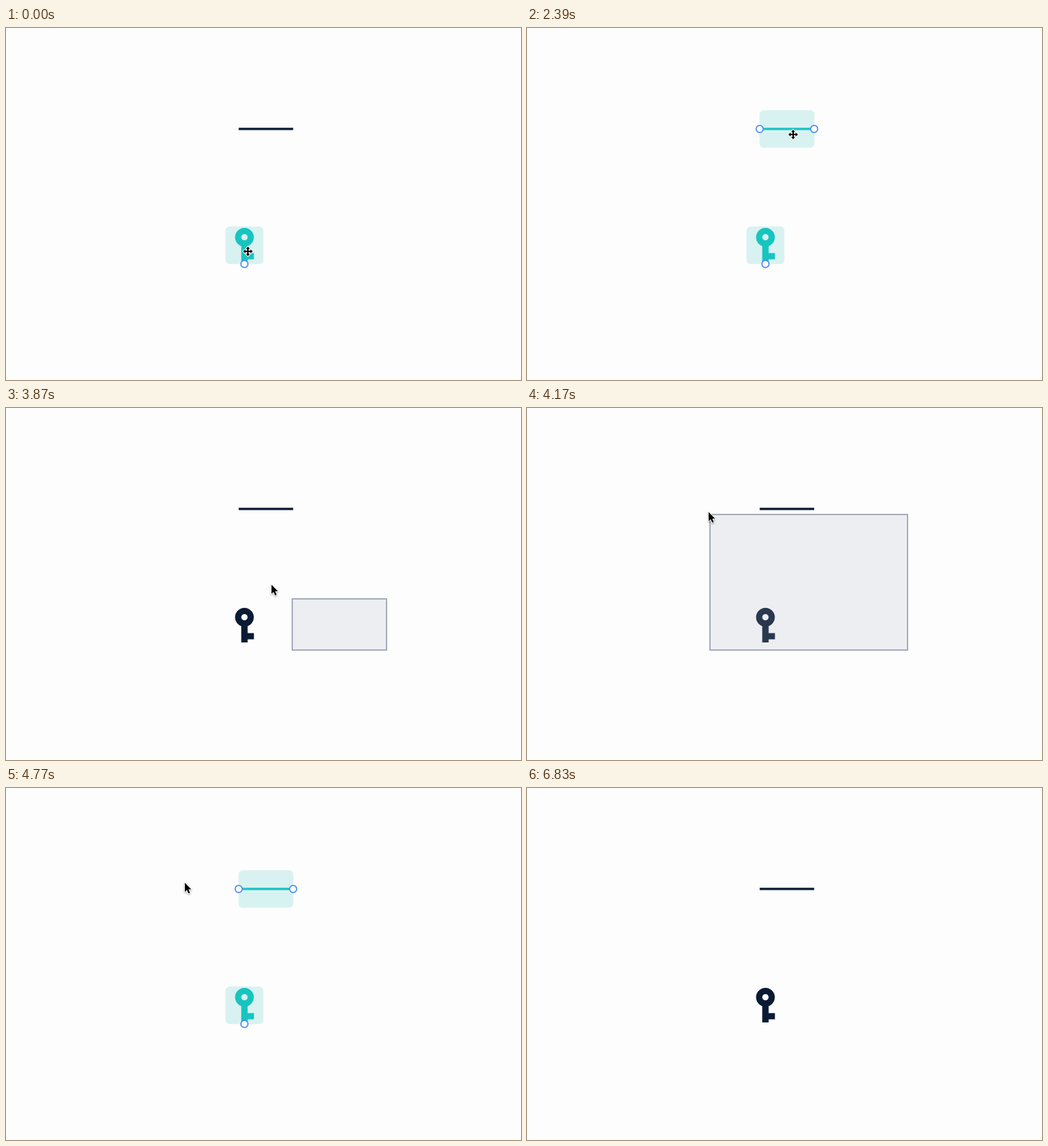
Animation of 743x509 px, one loop 7730 ms. Source, as an HTML page:

```html
<!DOCTYPE html>
<html lang="en">
<head>
<meta charset="utf-8">
<title>Selecting shapes</title>
<style>
html, body { margin: 0; width: 100%; height: 100%; overflow: hidden; background: #fdfdfd; }
svg { display: block; }
.shape { fill: #0a1a33; }
.halo { fill: #d8f2f1; }
.handle { fill: #fff; stroke: #4d8df6; stroke-width: 1.7; }
.halo, .handle { visibility: hidden; }
.selected .shape { fill: #18c4c0; }
.selected .halo, .selected .handle { visibility: visible; }
#marquee { fill: rgba(172, 176, 191, .2); stroke: #a6acbb; stroke-width: 2; }
#arrow { filter: drop-shadow(0 1px 1px rgba(0, 0, 0, .35)); }
#arrow, #move { stroke: #fff; stroke-width: 2; paint-order: stroke; stroke-linejoin: round; }
</style>
</head>
<body>
<svg width="743" height="509" viewBox="0 0 743 509">
  <g id="line">
    <rect class="halo" x="335.5" y="119" width="79" height="54.3" rx="6"/>
    <rect class="shape" x="335.7" y="144.3" width="78.6" height="3.3"/>
    <circle class="handle" cx="335.7" cy="146" r="5.1"/>
    <circle class="handle" cx="414.3" cy="146" r="5.1"/>
  </g>
  <g id="key">
    <rect class="halo" x="316.7" y="287" width="54.6" height="54.3" rx="6"/>
    <path class="shape" fill-rule="evenodd" d="M339.4 315.4A13.6 13.6 0 1 1 348.6 315.4V325.4H357.7V334.4H348.6V339H339.4ZM339.4 302.5a4.6 4.6 0 1 0 9.2 0a4.6 4.6 0 1 0 -9.2 0Z"/>
    <circle class="handle" cx="344" cy="341.3" r="5.1"/>
  </g>
  <rect id="marquee"/>
  <path id="arrow" d="M0 0V13.2L3 10.4L5.3 15.6L7.5 14.6L5.3 9.6H9.3Z"/>
  <path id="move" d="M0 -7L3 -3.6H1V-1H3.6V-3L7 0L3.6 3V1H1V3.6H3L0 7L-3 3.6H-1V1H-3.6V3L-7 0L-3.6 -3V-1H-1V-3.6H-3Z"/>
</svg>
<script>
const LOOP = 7730;
const CORNER = [549, 350];

// time, x, y, pointer kind
const pointer = [
  [0, 349, 323, 'move'],
  [1050, 362, 305, 'move'],
  [1200, 390, 257, 'arrow'],
  [1340, 396, 201, 'arrow'],
  [1490, 380, 151, 'move'],
  [2390, 384, 154, 'move'],
  [2530, 398, 166, 'move'],
  [2680, 411, 178, 'arrow'],
  [2830, 418, 185, 'arrow'],
  [3280, 462, 240, 'arrow'],
  [3430, 530, 325, 'arrow'],
  [3580, 549, 349, 'arrow'],
  [3720, 493, 319, 'arrow'],
  [3870, 383, 255.5, 'arrow'],
  [4020, 298, 187, 'arrow'],
  [4170, 262, 150.5, 'arrow'],
  [4320, 258, 142, 'arrow'],
  [4470, 258, 137, 'arrow'],
  [5210, 275, 148, 'arrow'],
  [5360, 370, 212, 'arrow'],
  [5510, 510, 322, 'arrow'],
  [5660, 602, 402, 'arrow'],
  [5800, 627, 424, 'arrow'],
  [5950, 600, 394, 'arrow'],
  [6100, 587, 380, 'arrow'],
  [6390, 598, 399, 'arrow'],
  [6530, 620, 446, 'arrow'],
  [6680, 632, 490, 'arrow'],
  [6830, 0, 0, 'none']
];

// time, left, top of the dragged box
const drag = [
  [3720, 515, 331],
  [3870, 413, 276],
  [4020, 314, 201],
  [4170, 264, 154],
  [4320, 259, 144],
  [4470, 259, 138]
];

const el = id => document.getElementById(id);
const line = el('line'), key = el('key'), marquee = el('marquee');
const kinds = { arrow: el('arrow'), move: el('move') };

const latest = (steps, t) => steps.findLast(s => s[0] <= t);
const within = (t, from, to) => t >= from && t < to;
const show = (node, on) => node.style.display = on ? '' : 'none';

function draw(t) {
  const again = within(t, 4770, 6100);
  key.classList.toggle('selected', t < 2980 || again);
  line.classList.toggle('selected', within(t, 1790, 2980) || again);

  const dragging = within(t, 3720, 4770);
  show(marquee, dragging);
  if (dragging) {
    const [, x, y] = latest(drag, t);
    const box = { x, y, width: CORNER[0] - x, height: CORNER[1] - y };
    for (const name in box) marquee.setAttribute(name, box[name]);
  }

  const [, px, py, kind] = latest(pointer, t);
  for (const name in kinds) {
    show(kinds[name], name === kind);
    kinds[name].setAttribute('transform', `translate(${px} ${py})`);
  }
}

const start = performance.now();
function frame() {
  draw((performance.now() - start) % LOOP);
  requestAnimationFrame(frame);
}
frame();
</script>
</body>
</html>
```
